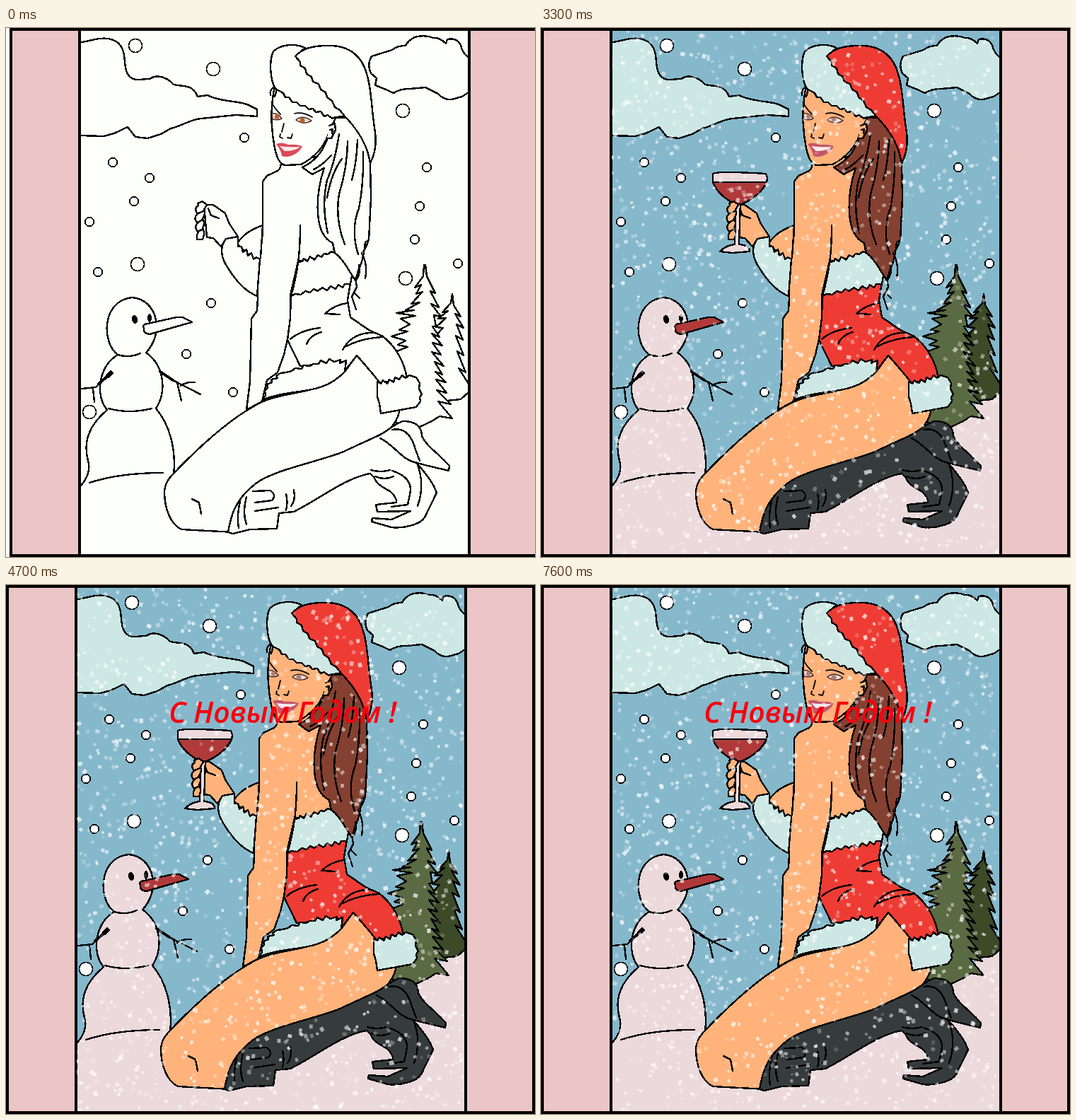
These frames come from a looping animation (748x748 px, 8 s). An HTML page with a canvas:

```html
<!DOCTYPE html>
<html lang="ru">
<head>
<meta charset="utf-8">
<style>
html, body { margin: 0; width: 100%; height: 100%; overflow: hidden; background: #fff; }
svg, canvas { position: absolute; left: 0; top: 0; width: 748px; height: 748px; }
#scene {
  --sky: #86b8cc; --cloud: #cde8e4; --snow: #ecd9db; --ball: #fff; --skin: #ffb27a;
  --red: #ee3c34; --hair: #844030; --boot: #363c3e; --pine: #5a6a42; --dark: #3c4a28;
  --carrot: #b03a3a; --lip: #c4566a; --iris: #b08074;
  shape-rendering: crispEdges; stroke: #000; stroke-width: 2.4; stroke-linejoin: round; stroke-linecap: round;
}
#scene.plain {
  --sky: #fdfffb; --cloud: #fdfffb; --snow: #fdfffb; --ball: #fdfffb; --skin: #fdfffb;
  --red: #fdfffb; --hair: #fdfffb; --boot: #fdfffb; --pine: #fdfffb; --dark: #fdfffb;
  --carrot: #fdfffb; --lip: #dc4a5a; --iris: #b8622e;
}
.plain #pic { transform: translateX(5px); }
.plain #glass, .plain #mark { display: none; }
.sky { fill: var(--sky); } .cloud { fill: var(--cloud); } .snow { fill: var(--snow); }
.ball { fill: var(--ball); stroke-width: 1.6; } .skin { fill: var(--skin); } .red { fill: var(--red); }
.hair { fill: var(--hair); } .boot { fill: var(--boot); } .pine { fill: var(--pine); }
.dark { fill: var(--dark); } .carrot { fill: var(--carrot); }
.line { fill: none; } .bare { stroke: none; } .ink { fill: #000; stroke: none; }
#face { shape-rendering: auto; }
#mark { font: 14px "Liberation Sans", Arial, sans-serif; fill: #000; stroke: none; }
#wish { font: italic 600 41px "Open Sans", "Noto Sans", sans-serif; fill: #f8000e; text-anchor: middle; }
</style>
</head>
<body>
<svg id="scene" viewBox="0 0 748 748">
<clipPath id="view"><rect x="99" y="4" width="550" height="740"/></clipPath>
<g id="pic">
  <rect class="bare" width="748" height="748" fill="#ecc6c6"/>
  <g clip-path="url(#view)">
    <rect class="sky bare" x="99" y="4" width="550" height="740"/>
    <path class="snow bare" d="M99,648 L240,625 580,560 626,524 649,514 V744 H99Z"/>

    <path class="cloud" d="M98,21 L117,17 C135,12 150,15 157,25 C166,38 160,52 167,65 C174,77 186,72 198,72 C210,64 224,71 232,80 C245,83 255,80 263,91 L266,97 280,95 C298,105 328,103 338,109 L350,115 V125 L320,123 271,128 C256,129 240,140 228,142 L214,150 195,156 178,154 167,140 148,149 133,153 98,152"/>
    <path class="cloud" d="M652,44 Q640,36 638,24 Q632,13 619,16 L617,22 Q608,13 599,14 Q588,9 573,13 Q563,18 560,25 Q548,25 541,31 L528,35 512,40 Q505,52 511,64 L519,71 517,81 530,86 543,92 Q552,86 566,86 L588,84 606,93 Q614,102 625,101 L640,97 652,89"/>
    <g id="balls"></g>

    <path class="dark" d="M626,376 L628,392 638,408 630,404 642,424 632,419 641,441 631,435 642,463 633,457 645,487 635,481 649,503 V515 L638,525 618,527 590,500 598,440 613,424 603,423 617,410 606,411 620,400 612,402 624,389Z"/>
    <path class="pine" d="M586,335 H588 L590,351 602,375 595,372 607,395 596,390 610,408 600,406 603,422 598,422 608,437 597,432 612,449 598,445 610,462 597,458 614,478 601,472 612,490 602,486 617,501 603,497 618,516 604,512 624,532 606,528 626,552 608,549 597,556 580,564 545,558 540,460 563,451 549,448 560,442 540,436 563,429 551,427 566,419 553,411 574,407 547,403 572,399 560,399 580,388 568,390 584,373 575,376 582,363 573,367 585,351Z"/>

    <path class="snow" d="M98,650 C110,638 115,624 111,612 C104,585 112,562 138,540 C122,522 124,480 153,462 C130,445 130,386 173,381 C210,384 219,432 193,459 C220,478 222,515 207,538 C226,560 236,595 232,633"/>
    <path class="line" d="M153,462 Q169,467 185,460 M140,538 Q170,546 201,538 M113,643 Q155,629 217,629"/>
    <path class="line" d="M145,487 L122,508 102,510 M118,510 L120,529 M231,498 L270,518 M242,506 Q250,500 262,501 M237,501 L243,527"/>
    <path class="line" stroke-width="4" d="M144,488 L126,503 M213,486 L231,498"/>
    <path class="line" stroke-width="7" d="M143,488 L140,491"/>
    <ellipse class="ink" cx="177" cy="412" rx="4" ry="6" transform="rotate(-15 177 412)"/>
    <ellipse class="ink" cx="198" cy="410" rx="3" ry="6"/>
    <path class="carrot" d="M191,419 L236,409 245,409 258,416 240,421 198,433 Q189,432 190,425 Q188,421 191,419Z"/>
    <text id="mark" x="212" y="426">3</text>

    <g id="girl">
      <path class="skin" d="M384,190 Q384,198 379,202 L364,209 358,217 358,290 C354,320 350,340 351,380 L350,400 342,411 340,500 335,540 357,528 364,498 379,487 388,462 393,440 397,410 397,378 408,330 460,322 445,230 V180Z"/>
      <path class="skin" d="M358,279 C340,285 327,295 322,305 L350,332 355,325Z"/>
      <path class="skin" d="M275,250 L288,250 305,262 311,277 323,295 306,299 299,309 288,297 279,296Z"/>
      <path class="line" d="M281,255 L285,265 296,269"/>
      <g id="glass">
        <path class="snow" d="M275,247 H282 L280,306 Q295,307 295,316 L270,318 253,316 Q262,307 274,306Z"/>
        <path class="snow" d="M243,206 Q250,202 318,206 L320,212 319,219 Q309,238 284,249 H275 Q250,237 243,218Z"/>
        <path class="carrot" d="M243,218 H319 Q309,238 284,249 H275 Q250,237 243,218Z"/>
      </g>
      <path class="skin" d="M266,248 L273,245 279,250 275,257 Q278,263 273,269 Q277,276 273,283 Q277,290 273,299 H265 Q264,292 267,289 Q260,281 266,276 Q259,269 266,263 Q260,255 267,251Z"/>
      <path class="line" d="M267,262 L274,259 M266,275 L273,271 M266,288 L274,284"/>
      <path class="cloud" d="M323,295 L306,298 C297,310 299,325 308,338 C320,358 335,373 350,379 L354,327 349,324 345,327 342,318 337,322 335,313 330,317 328,309 323,309Z"/>

      <path class="red" d="M398,372 L397,410 393,441 411,478 475,472 474,485 491,463 522,502 562,496 C558,470 545,450 528,436 L508,427 482,409 478,385 484,348Z"/>
      <path class="line" d="M397,440 Q412,427 439,424 M420,447 Q425,434 441,430 M467,405 L446,404 Q460,391 478,389 M471,455 Q485,430 515,431 M476,450 Q500,438 528,437"/>
      <path class="cloud" d="M408,331 l6,-1 2,-4 5,4 4,-7 6,5 5,-7 5,3 4,-5 5,1 5,-4 C470,322 486,338 484,350 L482,362 l-8,0 -3,5 -6,-4 -4,6 -7,-4 -5,6 -7,-4 -6,5 -6,-3 -5,5 -7,-2 -6,5 -8,-1 -6,3 Q405,355 408,331Z"/>
      <path class="line" d="M411,279 Q411,310 408,332"/>

      <path class="skin" d="M491,463 C515,490 548,530 551,543 C547,560 535,572 520,577 L500,598 350,665 318,713 243,709 C228,702 219,680 219,655 Q220,642 230,632 C270,590 310,555 345,535 C385,510 440,522 474,486Z"/>
      <path class="line" d="M258,666 L268,671 271,687"/>
      <path class="cloud" d="M476,470 l-9,4 1,-5 -9,3 -7,-4 -4,6 -8,-4 -3,5 -8,0 -4,3 -9,-1 -3,5 -9,-1 -5,4 -8,2 -8,1 -6,4 2,3 -9,2 1,4 -7,3 1,5 -4,4 1,7 -5,6 C400,508 440,522 474,486Z"/>
      <path class="cloud" d="M520,500 l5,3 3,-5 6,5 3,-6 6,4 2,-7 6,3 4,-6 5,4 5,-4 10,3 5,8 -1,8 4,8 -3,4 1,6 -6,8 -50,9 -2,-14 -3,-10Z"/>

      <path class="boot" d="M309,713 C313,690 318,668 347,645 C370,626 430,615 470,600 L520,577 C534,571 540,562 556,556 C574,556 583,563 583,577 C590,592 605,600 622,619 L621,626 C605,622 590,619 576,615 C586,628 598,640 604,657 L587,692 C580,703 555,708 540,706 L512,698 513,693 540,695 567,683 520,684 518,674 547,671 Q548,664 538,655 Q518,645 516,636 L510,630 C475,636 440,665 402,684 L381,686 378,708 340,709 316,715Z"/>
      <path class="line" d="M344,655 L369,654 Q378,661 371,668 L347,671 M347,683 L380,678 M326,669 Q321,690 324,707 M335,663 Q329,685 335,702 M391,659 Q394,670 391,682 M402,653 Q405,668 398,676"/>
      <path class="line" d="M524,580 C545,590 555,612 577,615 M541,568 Q565,563 574,596 L580,612 M511,625 Q525,629 538,625 M517,634 Q530,640 543,634 M541,626 Q572,636 566,660 L563,674 540,677 M576,615 Q588,645 577,676"/>

      <path class="hair" d="M455,127 L480,127 500,150 510,190 511,240 508,300 503,303 Q500,330 494,340 L489,357 482,346 Q470,325 460,318 L457,304 Q438,295 436,262 Q434,230 445,198 L428,207 414,197 Q440,185 450,155Z"/>
      <path class="line" d="M466,150 Q460,190 449,215 Q441,250 450,290 M478,160 Q478,195 466,235 Q460,270 474,306 M492,158 Q491,190 484,215 M500,175 Q501,220 494,255 Q482,285 493,320 M455,180 Q440,196 430,200 M470,185 Q455,205 449,240"/>
      <path class="line" d="M489,354 L491,366 484,380 490,398 M488,375 L495,382 M498,318 Q507,335 503,354 M494,335 Q497,348 490,356 M508,298 Q505,310 500,316"/>

      <path class="skin" d="M375,80 L372,100 C369,125 371,150 375,170 Q380,193 390,194 L412,193 C430,184 445,168 450,152 L462,125 440,100Z"/>
      <path class="skin" d="M452,138 L460,135 461,144 455,156 449,156"/>
      <path class="line" d="M453,144 L457,143 456,149 M375,82 Q367,88 369,95 M379,83 L375,97"/>
      <path class="cloud" d="M376,86 C368,73 367,45 373,33 C385,22 405,22 418,28 L404,40 l7,8 0,5 7,4 2,8 7,4 2,7 8,3 3,8 7,4 2,7 7,5 4,9 7,4 7,9 -13,1 -5,2 -6,-5 -5,2 -5,-7 -7,1 -4,-5 -6,1 -5,-5 -7,0 -5,-5 -6,0 -5,-7 -5,0 -3,-6Z"/>
      <path class="red" d="M404,40 C415,28 430,25 450,25 C485,24 500,45 505,65 C512,85 511,110 517,148 Q520,172 510,191 C506,165 492,143 474,125 l-7,-9 -7,-4 -4,-9 -7,-5 -2,-7 -7,-4 -3,-8 -8,-3 -2,-7 -7,-4 -2,-8 -7,-4 0,-5Z"/>

      <g id="face">
        <path class="line" stroke-width="1.8" d="M371,107 Q377,116 383,122 M403,121 Q414,118 428,126 M388,135 L385,147 M383,150 L382,154 386,156 M393,155 L398,156 400,150"/>
        <g stroke="#4a2c28" stroke-width="1.5">
          <path fill="#f0e4e2" d="M371,121 Q379,119 385,128 Q379,131 372,129Z"/>
          <circle class="bare" cx="378" cy="125.5" r="3.2" style="fill:var(--iris)"/>
          <g id="open">
            <path fill="#f0e4e2" d="M405,130 Q414,122 427,131 Q416,138 405,130Z"/>
            <circle class="bare" cx="414" cy="130.5" r="3.6" style="fill:var(--iris)"/>
          </g>
          <path id="shut" class="line" stroke-width="2" d="M405,131 Q415,138 427,130"/>
        </g>
        <path class="bare" style="fill:var(--lip)" d="M377,164 Q386,161 394,165 Q404,164 414,167 Q411,174 404,178 Q394,184 385,181 Q384,173 377,164Z"/>
        <path class="bare" fill="#f6ecec" d="M382,167 Q396,169 411,168 Q404,174 389,174Z"/>
      </g>
    </g>
  </g>
  <path class="line" stroke-width="4" stroke-linejoin="miter" d="M2,2 H746 V746 H2Z M98.5,2 V746 M649.5,2 V746"/>
</g>
</svg>
<canvas id="flakes" width="748" height="748"></canvas>
<svg viewBox="0 0 748 748"><text id="wish" x="391" y="195">С Новым Годом !</text></svg>
<script>
const LOOP = 8000, COLOR = 500, SNOW = 2500, STEP = 200, LAST = 18, WISH = 4500, WINK = [7100, 7600];
const $ = id => document.getElementById(id);
const ctx = $('flakes').getContext('2d');
const box = { x: 100, y: 4, w: 547, h: 739 };

const balls = (r, spots) => spots.split(' ').map(p => {
  const [x, y] = p.split(',');
  return `<circle class="ball" cx="${x}" cy="${y}" r="${r}"/>`;
}).join('');
$('balls').innerHTML =
  balls(9.5, '178,25 288,58 556,117 181,334 560,354 113,543') +
  balls(6.2, '332,155 146,190 198,212 176,245 113,274 125,345 285,389 250,461 316,515 590,197 580,252 573,299 634,333');

let seed = 2024;
const rand = () => (seed = (seed * 16807) % 2147483647) / 2147483647;
const flakes = Array.from({ length: 1500 }, () => ({
  x: rand() * box.w, y: rand() * box.h, size: 3.5 + rand() * 3,
  fall: 10 + rand() * 14, drift: rand() * 6 - 3,
  turn: rand() * 6.28, spin: rand() - 0.5, alpha: 0.15 + rand() * 0.6
}));
const wrap = (v, n) => ((v % n) + n) % n;

function drawSnow(step) {
  ctx.setTransform(1, 0, 0, 1, 0, 0);
  ctx.clearRect(0, 0, 748, 748);
  if (step < 0) return;
  ctx.save();
  ctx.beginPath();
  ctx.rect(box.x, box.y, box.w, box.h);
  ctx.clip();
  ctx.fillStyle = '#fff';
  for (const f of flakes) {
    const a = f.turn + f.spin * step, c = Math.cos(a), s = Math.sin(a);
    ctx.setTransform(c, s, -s, c,
      box.x + wrap(f.x + f.drift * step, box.w),
      box.y + wrap(f.y + f.fall * step, box.h));
    ctx.globalAlpha = f.alpha;
    ctx.fillRect(-f.size / 2, -f.size / 2, f.size, f.size * 0.85);
  }
  ctx.restore();
}

const show = (id, on) => { $(id).style.visibility = on ? 'visible' : 'hidden'; };
const start = performance.now();
let shown = null;

function frame() {
  const t = (performance.now() - start) % LOOP;
  const step = t < SNOW ? -1 : Math.min(LAST, Math.floor((t - SNOW) / STEP));
  const wink = t >= WINK[0] && t < WINK[1];
  $('scene').classList.toggle('plain', t < COLOR);
  show('mark', t < SNOW);
  show('wish', t >= WISH);
  show('open', !wink);
  show('shut', wink);
  if (step !== shown) drawSnow(shown = step);
  requestAnimationFrame(frame);
}
frame();
</script>
</body>
</html>
```
